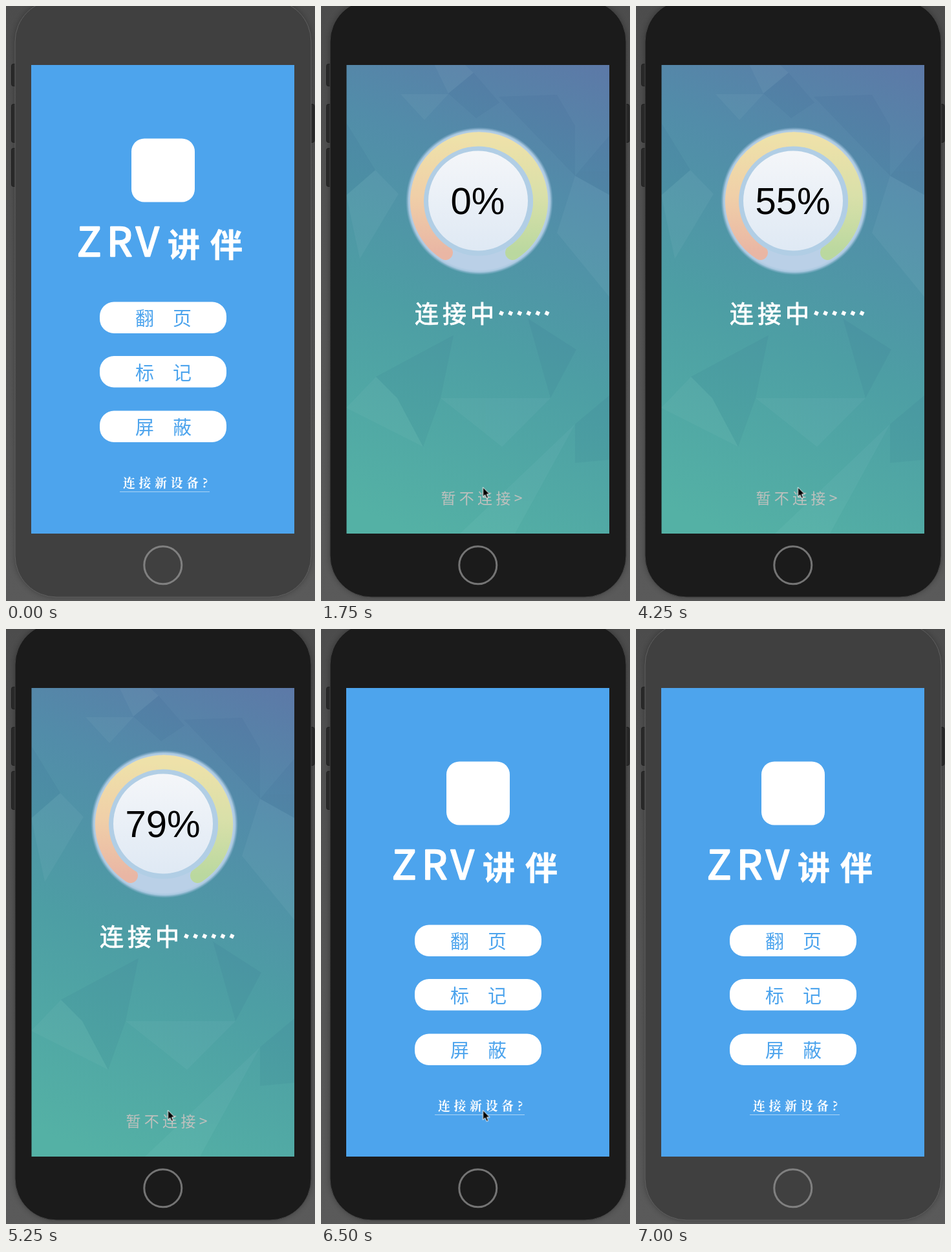
An HTML page for the animation above (7.5 s loop, 478 by 918 pixels).

```html
<!DOCTYPE html>
<html lang="zh-CN">
<head>
<meta charset="utf-8">
<title>讲伴</title>
<style>
  html, body { margin: 0; width: 100%; height: 100%; overflow: hidden; background: #4e4e4e; }
  svg { display: block; width: 100vw; height: 100vh; }
  text { font-family: "Noto Sans CJK SC", "Noto Sans CJK", sans-serif; }
  .body, .home, .link, .cursor { animation: 7.5s step-end infinite; }

  .body { animation-name: body; }
  .keys { fill: #292929; stroke: #1f1f1f; }
  .link { fill: none; stroke: #808080; stroke-width: 3; animation-name: ring; }
  .home { animation-name: home; }
  .cursor { animation-name: cursor; }

  .title { fill: #fff; stroke: #fff; stroke-width: 2.4px; stroke-linejoin: round; font-size: 62px; }
  .title .han { font-size: 50px; font-weight: 700; stroke-width: .6px; }
  .menu text { fill: #4da4ed; font-size: 29px; }
  .menu rect { fill: #fff; }
  .serif { font: 600 19px "Noto Serif CJK SC", "Noto Sans CJK SC", serif; letter-spacing: 5.5px; fill: #fff; }
  .count { font: 58px "Liberation Sans", Arial, sans-serif; text-anchor: middle; }
  .wait { font-size: 37px; letter-spacing: 6px; fill: #fff; stroke: #fff; stroke-width: .9px; }
  .skip { font-size: 23px; letter-spacing: 5.3px; fill: #bfc0bd; }

  @keyframes body {
    0%, 93.3333% { fill: #404040; stroke: #606060; }
    23.3333% { fill: #1b1b1b; stroke: #444; }
  }
  @keyframes ring { 0%, 93.3333% { stroke: #808080; } 23.3333% { stroke: #747474; } }
  @keyframes home { 0%, 86.6666% { opacity: 1; } 23.3333% { opacity: 0; } }
  @keyframes cursor {
    0% { opacity: 0; transform: translate(386px, 676px); }
    3.3333% { opacity: 1; transform: translate(386px, 676px); animation-timing-function: steps(4, end); }
    16.6666% { opacity: 1; transform: translate(250.5px, 742.5px); }
    93.3333%, 100% { opacity: 0; transform: translate(250.5px, 742.5px); }
  }
</style>
</head>
<body>
<svg viewBox="0 0 478 918" preserveAspectRatio="none">
  <defs>
    <linearGradient id="desk" x2="0" y2="1">
      <stop stop-color="#4c4c4c"/><stop offset=".5" stop-color="#545454"/><stop offset="1" stop-color="#5a5a5a"/>
    </linearGradient>
    <linearGradient id="sea" gradientUnits="userSpaceOnUse" x1="420" y1="70" x2="110" y2="800">
      <stop stop-color="#5d78a7"/><stop offset=".28" stop-color="#528ca9"/>
      <stop offset=".6" stop-color="#4d9ea4"/><stop offset="1" stop-color="#54b1a5"/>
    </linearGradient>
    <linearGradient id="warm" x2="0" y2="1">
      <stop stop-color="#eee1a9"/><stop offset=".5" stop-color="#f0cfa8"/><stop offset="1" stop-color="#e9b6a4"/>
    </linearGradient>
    <linearGradient id="cool" x2="0" y2="1">
      <stop stop-color="#eee1a9"/><stop offset=".5" stop-color="#d9e0a9"/><stop offset="1" stop-color="#bad89f"/>
    </linearGradient>
    <linearGradient id="dial" x2="0" y2="1">
      <stop stop-color="#f4f6f9"/><stop offset="1" stop-color="#dfe9f4"/>
    </linearGradient>
    <radialGradient id="halo">
      <stop offset=".93" stop-color="#bad0e7"/><stop offset=".96" stop-color="#a9c8e0"/>
      <stop offset="1" stop-color="#8fb5d2" stop-opacity="0"/>
    </radialGradient>
    <filter id="soft"><feGaussianBlur stdDeviation="5"/></filter>
    <clipPath id="screen"><rect x="39.5" y="91" width="406.5" height="723"/></clipPath>
  </defs>

  <rect width="478" height="918" fill="url(#desk)"/>
  <rect x="14" y="-9" width="458" height="921" rx="64" opacity=".3" filter="url(#soft)"/>
  <g class="keys">
    <rect x="8.5" y="89.5" width="10" height="34" rx="3"/>
    <rect x="8.5" y="151.5" width="10" height="59" rx="3"/>
    <rect x="8.5" y="219.5" width="10" height="59" rx="3"/>
    <rect x="467" y="151.5" width="10" height="59" rx="3"/>
  </g>
  <rect class="body" x="14" y="-9" width="458" height="921" rx="64"/>
  <circle class="link" cx="242.8" cy="862.8" r="29"/>

  <g clip-path="url(#screen)">
    <rect x="39" y="90" width="408" height="725" fill="url(#sea)"/>
    <g fill="#173c70" opacity=".05">
      <path d="M236 103L197 135 240 173 276 149z"/>
      <path d="M275 140L365 137 393 185V262z"/>
      <path d="M447 199L393 262 447 292z"/>
      <path d="M39 180L84 253 39 292z"/>
      <path d="M85 572L205 508 185 605H118z"/>
      <path d="M320 482L355 605 395 530z"/>
      <path d="M118 605H185L158 680z"/>
      <path d="M393 645L447 600V700L393 705z"/>
    </g>
    <g fill="#d6f5ff" opacity=".045">
      <path d="M123 136H197L160 176z"/>
      <path d="M175 90H222L236 103 197 135z"/>
      <path d="M84 253L120 290 60 390 39 292z"/>
      <path d="M393 262L365 350 447 450V292z"/>
      <path d="M85 572L118 605 158 680 39 620z"/>
      <path d="M185 605H355L280 680z"/>
      <path d="M393 645L330 705 215 814H300z"/>
    </g>

    <circle cx="245" cy="301" r="114" fill="url(#halo)"/>
    <g fill="none" stroke-width="23">
      <path d="M192.5 380.5A95 95 0 0 1 244.5 206" stroke="url(#warm)" stroke-linecap="round"/>
      <path d="M296.5 380.5A95 95 0 0 0 244.5 206" stroke="url(#cool)" stroke-linecap="round"/>
    </g>
    <circle cx="243.5" cy="301" r="84.5" fill="#b1cee5"/>
    <circle cx="243" cy="300.5" r="77" fill="url(#dial)"/>
    <text class="count" id="count" x="242.5" y="321">0%</text>

    <text class="wait" x="145" y="489">连接中</text>
    <g id="dots" fill="#fff"></g>
    <text class="skip" x="185.5" y="768">暂不连接&gt;</text>

    <g class="home">
      <rect x="39" y="90" width="408" height="725" fill="#4da4ed"/>
      <rect x="194" y="204.5" width="98" height="98" rx="20" fill="#fff"/>
      <text class="title" y="386"><tspan x="110 156 201">ZRV</tspan><tspan class="han" x="250 316" y="387">讲伴</tspan></text>
      <g class="menu">
        <rect x="145" y="456.5" width="196" height="48.5" rx="22"/>
        <text x="200 258" y="493">翻页</text>
        <rect x="145" y="540" width="196" height="48.5" rx="22"/>
        <text x="200 258" y="576.5">标记</text>
        <rect x="145" y="624.5" width="196" height="48.5" rx="22"/>
        <text x="200 258" y="661">屏蔽</text>
      </g>
      <text class="serif" x="181" y="742.5">连接新设备?</text>
      <path d="M176 749.5H315" stroke="#a9d2f5"/>
    </g>
  </g>

  <path class="cursor" d="M0 0V14.8L3.3 11.7 5.8 17.2 8.3 16.1 6 10.8H10.5z" stroke="#fff" stroke-linejoin="round"/>
</svg>
<script>
  const LOOP = 7500, STEP = 250;
  const count = document.getElementById("count");

  document.getElementById("dots").innerHTML = Array.from({ length: 6 }, (_, i) =>
    `<rect x="-3" y="-3" width="6" height="6" transform="translate(${279 + i * 14.1} 474) rotate(25)"/>`
  ).join("");

  function percent(t) {
    const n = Math.floor((t - 2000) / STEP);
    return n < 1 ? 0 : Math.min(100, 6 * n + 1);
  }

  let start;
  function tick(now) {
    start ??= now;
    const label = percent((now - start) % LOOP) + "%";
    if (count.textContent !== label) count.textContent = label;
    requestAnimationFrame(tick);
  }
  requestAnimationFrame(tick);
</script>
</body>
</html>
```
